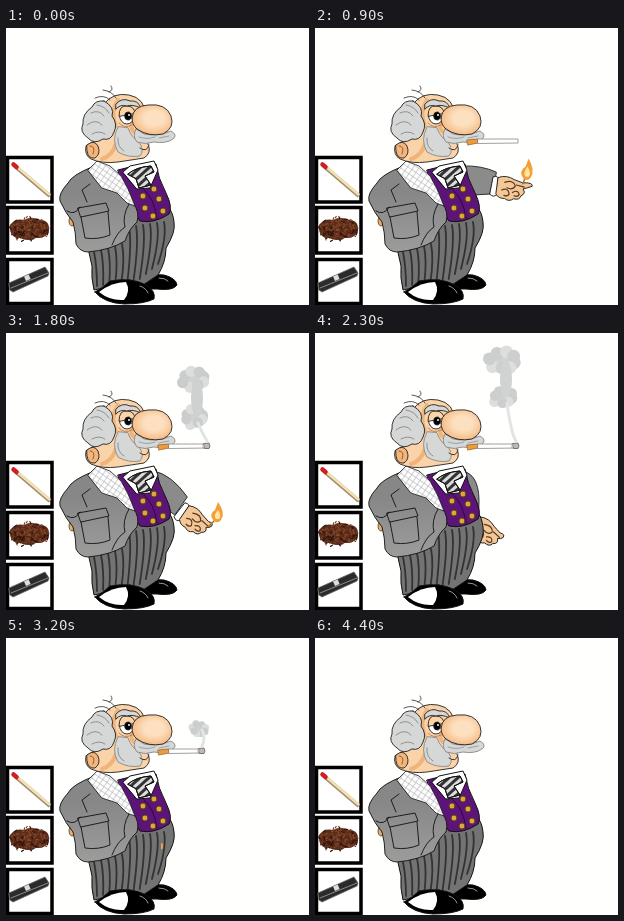
Recreate the animation shown at these times as an HTML page. Size 303x277 px, loop 4.5 s.

```html
<!DOCTYPE html>
<html lang="en">
<head>
<meta charset="utf-8">
<title>A smoke</title>
<style>
html, body { margin: 0; width: 100%; height: 100%; overflow: hidden; background: #fffffd; }
svg { display: block; width: 303px; height: 277px; }
.skin { fill: #fbd3a8; }
.hair { fill: #d5d8d7; }
.coat { fill: #8b8b8b; }
.white { fill: #fff; }
.line { fill: none; }
</style>
</head>
<body>
<svg viewBox="0 0 303 277" stroke-linejoin="round" stroke-linecap="round">
  <defs>
    <pattern id="check" width="5" height="5" patternUnits="userSpaceOnUse" patternTransform="rotate(35)">
      <path d="M0 0H5M0 0V5" stroke="#999" stroke-width=".9"/>
    </pattern>
    <pattern id="stripe" width="6" height="6" patternUnits="userSpaceOnUse" patternTransform="rotate(-42)">
      <path d="M0 1.5H6" stroke="#333" stroke-width="3"/>
    </pattern>
    <radialGradient id="nose" cx=".55" cy=".45" r=".6">
      <stop offset=".4" stop-color="#fde0bf"/><stop offset="1" stop-color="#f4b67e"/>
    </radialGradient>
    <linearGradient id="cloth" x2="0" y2="1">
      <stop offset=".3" stop-color="#878787"/><stop offset="1" stop-color="#9b9d9b"/>
    </linearGradient>
    <filter id="soft" x="-30%" y="-30%" width="160%" height="160%"><feGaussianBlur stdDeviation=".5"/></filter>
    <clipPath id="bowl"><rect x="3" y="181" width="41" height="41"/></clipPath>
  </defs>

  <!-- smoking kit -->
  <g fill="#fff" stroke="#000" stroke-width="3.5" stroke-linejoin="miter">
    <rect x="1.5" y="129.5" width="44.5" height="44.5"/>
    <rect x="1.5" y="179.5" width="44.5" height="45.5"/>
    <rect x="1.5" y="231.5" width="44.5" height="44"/>
  </g>
  <path d="M10 139L44 168" stroke="#a08a66" stroke-width="4" stroke-linecap="butt"/>
  <path d="M10 138L44 167" stroke="#f3e2b5" stroke-width="2.5" stroke-linecap="butt"/>
  <path d="M7.5 136.5L10.5 139" stroke="#cf1f24" stroke-width="4.5"/>
  <path d="M4 197Q10 190 18 192Q27 188 34 192Q44 192 43 203Q40 211 30 210Q22 214 14 210Q3 210 4 197Z" fill="#5a2b18"/>
  <g id="leaf" class="line" stroke-width="1.2" clip-path="url(#bowl)"/>
  <path d="M3 255L39 239L43 245L42 248L7 264L4 262Z" fill="#2b2b2b" stroke="#666" stroke-width=".8"/>
  <path d="M5 260L42 245" stroke="#8a8a8a"/>
  <rect x="19" y="247" width="5" height="5" transform="rotate(-23 22 250)" fill="#ddd"/>

  <g id="arm" stroke="#222" stroke-width=".9"></g>

  <!-- legs and shoes -->
  <g stroke="#111">
    <path d="M137 254Q147 245 158 247Q170 250 171 257Q167 263 151 261L140 261Z" fill="#000"/>
    <path d="M82 220L86 238Q85 250 88 262Q100 260 106 254L124 252L137 257L152 247Q160 234 160 220Q170 204 168 194Q167 184 162 179L118 188Z" fill="#737373"/>
    <g id="pinstripes" class="line" stroke="#333" stroke-width="1.8"/>
    <path d="M89 264Q97 260 104 253Q126 249 140 257Q150 263 148 271Q138 276 118 276Q98 275 89 264Z" fill="#000"/>
    <path d="M93 264Q106 254 120 254Q125 263 118 272Q104 273 93 264Z" class="white" stroke="none"/>
    <path d="M153 250Q159 250 162 253M134 258Q140 260 142 265" class="line" stroke="#999"/>
  </g>

  <!-- waistcoat, shirt and coat -->
  <g stroke="#111">
    <path d="M112 142L124 139L150 136Q152 150 160 165Q167 179 163 186Q148 196 134 193Q126 184 124 174Z" fill="#5d1478"/>
    <path d="M117 144L124 138L148 133L152 142L144 160L131 161Z" class="white"/>
    <path d="M122 146Q130 139 145 138L148 144L139 148L145 157L133 160L130 151Z" fill="#ddd"/>
    <path d="M122 146Q130 139 145 138L148 144L139 148L145 157L133 160L130 151Z" fill="url(#stripe)"/>
    <path d="M138 162Q148 170 151 190" class="line" stroke="#2d0548"/>
    <g id="buttons" fill="#d9a93a" stroke="#5b3c0c" stroke-width=".9"/>
    <ellipse cx="66" cy="193" rx="3" ry="5" fill="#f0ad62" stroke-width=".6"/>
    <path d="M86 139Q66 147 62 155Q52 166 54 173Q60 186 67 194Q70 205 70 216Q74 224 82 224Q104 222 119 213Q123 201 131 194Q134 184 127 175L112 158L98 146Z" fill="url(#cloth)" stroke-width=".9"/>
    <path d="M84 156L76 162L81 174M61 183Q69 188 74 179M123 176Q116 188 119 199Q111 204 106 217" class="line" stroke-width=".9"/>
    <path d="M72 180L100 175L103 183L75 189ZM75 189L79 210Q92 212 104 207L102 184" class="line" stroke-width=".9"/>
    <path d="M82 142L91 133L104 138L115 148L122 161L129 178L121 175L111 165L96 160Z" class="white" stroke-width=".8"/>
    <path d="M82 142L91 133L104 138L115 148L122 161L129 178L121 175L111 165L96 160Z" fill="url(#check)" stroke="none"/>
  </g>
  <path id="palm" d="M155 206Q157 203 157 208Q157 212 155 211Z" fill="#efa24b"/>

  <!-- head -->
  <g stroke="#222" stroke-width=".9">
    <path d="M80 118Q78 127 85 131Q96 136 112 134L138 130Q146 125 142 116L140 88Q139 70 123 67Q107 64 98 76Q88 92 90 112Z" class="skin"/>
    <path d="M96 131Q106 128 110 116M112 72Q104 84 110 98M126 96Q124 101 128 104" class="line" stroke="#efb47b" stroke-width="4"/>
    <path d="M98 73Q89 72 86 79Q76 86 77 96Q73 104 82 110Q88 117 97 111Q105 113 108 104Q112 96 106 88Q109 79 98 73Z" class="hair"/>
    <path d="M112 99Q105 112 112 124Q122 130 134 128Q139 122 133 114Q125 109 122 100Z" class="hair" stroke="#888"/>
    <path d="M81 117Q88 111 92 118Q95 126 89 130Q82 131 81 123Z" fill="#f2b57c"/>
    <path d="M84 118Q90 118 87 126" class="line" stroke="#8c552c"/>
    <path d="M85 85Q93 81 98 88M81 97Q90 90 96 97M91 77Q99 78 103 85M112 110Q111 119 118 123M86 106Q93 102 99 106" class="line" stroke="#888"/>
    <path d="M89 70Q98 66 104 72M97 62Q106 63 110 70M105 58Q108 62 103 64" class="line" stroke="#444"/>
    <path d="M134 120Q141 125 143 117" class="skin"/>
    <ellipse cx="121" cy="87" rx="7.5" ry="9" class="white"/>
    <path d="M113 88Q113 77 121 78Q128 78 129 85Z" class="skin"/>
    <ellipse cx="122" cy="88" rx="3.3" ry="4" fill="#000"/>
    <circle cx="123" cy="87" r="1" fill="#fff" stroke="none"/>
    <path d="M110 76Q116 69 124 73Q132 72 135 80Q126 76 121 78Q114 76 110 81Z" class="hair"/>
    <path d="M113 95Q118 101 126 97" class="line" stroke="#b7794c"/>
    <path d="M130 101Q134 103 138 106Q152 109 165 103Q172 107 167 111Q160 116 148 114Q139 117 131 114Q126 108 130 101Z" class="hair" stroke="#888"/>
    <path d="M133 109Q141 112 149 109M153 110L163 108" class="line" stroke="#999"/>
    <path d="M126 90Q127 78 142 77Q160 75 165 88Q169 100 157 106Q142 109 131 101Q126 97 126 90Z" fill="url(#nose)"/>
  </g>

  <g id="cigarette"></g>
  <g id="smoke" filter="url(#soft)"></g>
  <g id="flame"></g>
</svg>
<script>
const $ = id => document.getElementById(id);

// Linear interpolation through [time, value] points.
function key(t, ...points) {
  if (t <= points[0][0]) return points[0][1];
  for (let i = 1; i < points.length; i++) {
    const [a, from] = points[i - 1], [b, to] = points[i];
    if (t <= b) return from + (to - from) * (t - a) / (b - a);
  }
  return points.at(-1)[1];
}

function random(seed) {
  const v = Math.sin(seed * 127.1) * 43758.5453;
  return v - Math.floor(v);
}

function drawDetails() {
  let leaf = "", stripes = "", buttons = "";
  for (let i = 0; i < 110; i++) {
    const turn = random(i) * 6.28, far = Math.sqrt(random(i + 90));
    const x = 23 + Math.cos(turn) * far * 20, y = 201 + Math.sin(turn) * far * 12;
    const color = ["#8a4a2b", "#2f150c", "#74402a"][i % 3];
    leaf += `<path stroke="${color}" d="M${x} ${y}l${random(i + 200) * 6 - 3} ${random(i + 300) * 5 - 2}"/>`;
  }
  for (let i = 0; i < 11; i++) {
    const x = 88 + i * 7, top = i < 5 ? 224 - i * 2 : 204 - i;
    const bottom = i < 7 ? 258 - i : 286 - i * 5;
    stripes += `<path d="M${x} ${top}Q${x + 3} ${top + 15} ${x + 3 - i * .9} ${bottom}"/>`;
  }
  for (const [x, y] of [[137, 168], [148, 161], [139, 180], [153, 171], [147, 188], [157, 183]])
    buttons += `<circle cx="${x}" cy="${y}" r="3"/>`;
  $("leaf").innerHTML = leaf;
  $("pinstripes").innerHTML = stripes;
  $("buttons").innerHTML = buttons;
}

function drawArm(t) {
  const visible = t >= 200 && t < 2600;
  const x = key(t, [200, 160], [600, 188], [1100, 198], [1300, 198], [1800, 188], [2600, 160]);
  const y = key(t, [200, 205], [600, 187], [1100, 142], [1300, 142], [1800, 187], [2600, 205]);
  const raise = key(y, [142, 1], [187, 0]);
  const angle = 35 - 45 * raise, turn = angle * Math.PI / 180;
  const wristX = x - 13 - raise * 2, wristY = y - 14 + raise * 15;
  const across = 11 * Math.sin(turn), along = 11 * Math.cos(turn);
  $("arm").innerHTML = visible ? `
    <path d="M148 138Q166 ${142 - raise * 8} ${wristX + across} ${wristY - along}L${wristX - across} ${wristY + along}Q158 ${174 - raise * 12} 150 168Z" class="coat"/>
    <g transform="translate(${x} ${y}) rotate(${angle})">
      <path d="M-17-9Q-12-11-12-7L-11 8Q-14 12-18 9Z" class="white"/>
      <path d="M-12-9Q-4-13 4-9L13-7Q${18 + 8 * raise}-9 ${18 + 8 * raise}-5Q17-2 14-1Q18 3 13 6Q12 11 6 10Q2 14-3 11Q-9 12-12 8Z" fill="#f3c796"/>
      <path d="M-5-5Q3-9 6-3Q4 2-2 0M-7 3Q-1-1 1 6Q0 9-4 8M4 4Q9 0 11 5Q10 8 6 7M7-4L15-3" class="line" stroke="#5a3a22" stroke-width="1.2"/>
    </g>` : "";

  const lit = t >= 500 && t < 2200;
  const flameX = x + 23 - raise * 9, flameY = y + 1 - raise * 17;
  const sway = t % 200 ? 1 : 0, height = 19 + raise * 2;
  $("flame").innerHTML = lit ? `
    <path d="M${flameX - 8 + raise * 7} ${flameY + 5}L${flameX - 1} ${flameY - 2}" stroke="#a66b2d" stroke-width="1.5"/>
    <g transform="translate(${flameX} ${flameY})">
      <path d="M-3 0Q-9-7 ${sway - 2}-${height - 8}L${sway + 1}-${height}Q9-8 4-1Q1 3-3 0Z" fill="#f3a03a"/>
      <path d="M-1-2Q-4-6 1-${height - 8}Q5-5 2-2Z" fill="#ffe5a0"/>
    </g>` : "";
}

function drawCigarette(t) {
  const visible = t >= 100 && t < 4300;
  const end = key(t, [100, 168], [400, 203], [2800, 203], [3600, 193], [4200, 169]);
  const filter = Math.min(163, end - 2);
  const ember = t >= 1300;
  $("cigarette").innerHTML = visible ? `
    <path d="M152 112L${filter} 111V115L153 117Z" fill="#ee9b3c" stroke="#955a1d" stroke-width=".7"/>
    <path d="M${filter} 111L${end} 111V115L${filter} 115.5Z" fill="#fff" stroke="#888" stroke-width=".8"/>
    ${ember ? `<path d="M${end - 5} 110.5L${end} 110L${end + 1} 113L${end} 115.5L${end - 4} 115.5Z" fill="#bbb" stroke="#555" stroke-width=".7"/>
    <path d="M${end - 6} 112V115" stroke="#d77a35" stroke-width=".7"/>` : ""}` : "";
  return end;
}

function plume(t, top, x, opacity, end) {
  const puff = (cx, cy, r, seed) => {
    let dots = `<ellipse cx="${cx}" cy="${cy}" rx="${r}" ry="${r * .8}" fill="#cfd1d1"/>`;
    for (let i = 0; i < 8; i++) {
      const turn = i * .785 + t / 900, far = r * (.5 + random(seed + i) * .35);
      dots += `<circle cx="${cx + Math.cos(turn) * far * 1.15}" cy="${cy + Math.sin(turn) * far * .85}" r="${r * .4}" fill="${i % 3 ? "#cbcdcd" : "#dcdede"}"/>`;
    }
    return dots;
  };
  const size = key(top, [12, 16], [33, 14], [79, 10], [95, 5]);
  const low = Math.min(86, top + 52);
  const highY = top + size, neckY = (highY + low) / 2;
  let shapes = puff(x, highY, size, 3);
  if (top < 60) {
    shapes += puff(x, low, 13, 30);
    shapes += `<ellipse cx="${x + 2}" cy="${neckY}" rx="6" ry="${(low - highY) / 2}" fill="#cfd1d1"/>`;
  }
  shapes += `<path d="M${x + 3} ${Math.min(low, 92) + 6}Q${x + 7} 100 ${end - 2} 108" class="line" stroke="#e2e3e3" stroke-width="3"/>`;
  return `<g opacity="${opacity}">${shapes}</g>`;
}

function drawSmoke(t, end) {
  let shapes = "";
  if (t >= 1200 && t < 3100)
    shapes = plume(t, key(t, [1200, 95], [1300, 79], [1800, 32], [2100, 12]), 189,
      key(t, [2100, 1], [2800, .85], [3100, 0]), end);
  else if (t >= 3100 && t < 4200)
    shapes = plume(t, key(t, [3100, 95], [3600, 33], [3900, 13]), key(t, [3600, 193], [4200, 184]),
      key(t, [3800, 1], [4200, 0]), end);
  $("smoke").innerHTML = shapes;
}

function draw() {
  const t = Math.floor(performance.now() % 4500 / 100) * 100;
  drawArm(t);
  drawSmoke(t, drawCigarette(t));
  $("palm").style.display = t === 100 || (t >= 2600 && t < 4400) ? "" : "none";
  requestAnimationFrame(draw);
}

drawDetails();
draw();
</script>
</body>
</html>
```
